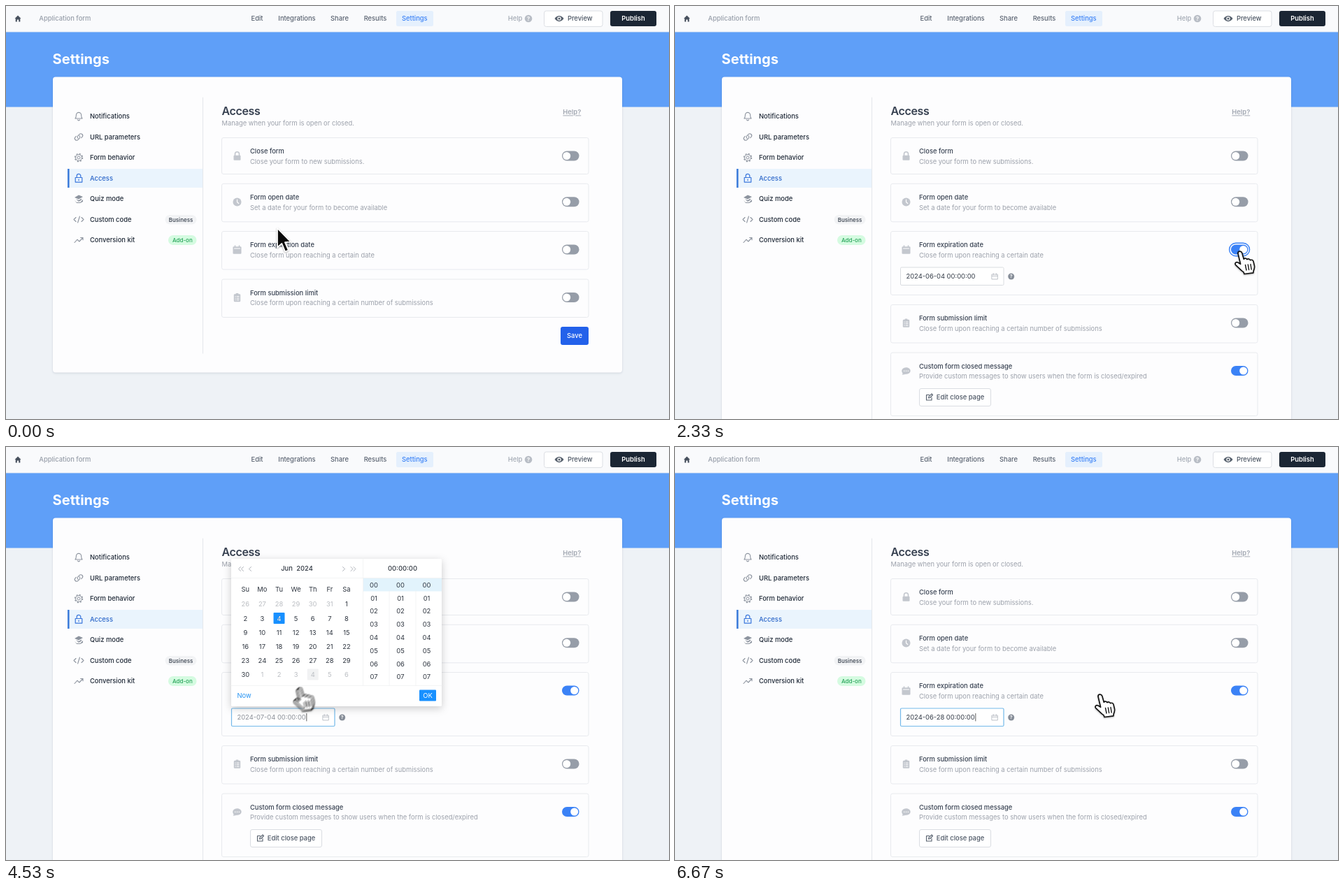
Recreate the animation shown at these times as an HTML page. Size 948 by 591 pixels, loop 6.74 s.

```html
<!DOCTYPE html>
<html lang="en">
<head>
<meta charset="utf-8">
<title>Form settings</title>
<style>
  html, body { margin: 0; width: 100%; height: 100%; overflow: hidden; background: #eef2f6; }
  svg { display: block; width: 100vw; height: 100vh; }
  text { font: 400 9.37px Inter, "Open Sans", sans-serif; white-space: pre; }
  .line { fill: none; stroke-width: 1.1; stroke-linecap: round; stroke-linejoin: round; }
  .timed, .cursor, .knob, .pill { animation: 6740ms linear infinite; }
  .knob { animation-name: knob; }
  .pill { animation-name: pill; }
  @keyframes knob { 0%, 31.9% { transform: none } 33.5%, 100% { transform: translateX(11px) } }
  @keyframes pill { 0%, 31.9% { fill: #969da8 } 33.5%, 100% { fill: #3b82f6 } }
  .cursors { isolation: isolate; filter: drop-shadow(0 1.5px 1.2px rgba(0,0,0,.3)); }
  .cursor { animation-name: travel; opacity: .2; mix-blend-mode: plus-lighter; }
</style>
</head>
<body>
<svg id="stage" viewBox="0 0 948 591" preserveAspectRatio="none"></svg>
<script>
const LOOP = 6740;
const OPENED = 2200, HOVERED = 3300, FOCUSED = 3800, PICKED = 5100, CLOSED = 6200;
const rules = [];
const pct = ms => (ms / LOOP * 100).toFixed(3) + '%';

// Shows content from one time to another, optionally fading in and out.
function during(from, to, content, fade = 1) {
  const name = 'show' + rules.length;
  const stops = [[0, from ? 0 : 1]];
  if (from) stops.push([from, 0], [from + fade, 1]);
  if (to < LOOP) stops.push([to, 1], [to + fade, 0]);
  stops.push([LOOP, to < LOOP ? 0 : 1]);
  rules.push(`@keyframes ${name}{${stops.map(([t, o]) => `${pct(t)}{opacity:${o}}`).join('')}}`);
  return `<g class="timed" style="animation-name:${name}">${content}</g>`;
}

// Text is placed by the vertical middle of its capitals.
function text(x, y, label, color, { size = 9.37, weight = 400, anchor = 'start', extra = '' } = {}) {
  return `<text x="${x}" y="${y + size * .363}" fill="${color}" text-anchor="${anchor}"
    style="font-size:${size}px;font-weight:${weight};${extra}">${label}</text>`;
}
const mid = (x, y, label, color, weight = 500, size) =>
  text(x, y, label, color, { weight, size, anchor: 'middle' });
const box = (x, y, w, h, fill, r = 0, stroke = 'none', more = '') =>
  `<rect x="${x}" y="${y}" width="${w}" height="${h}" rx="${r}" fill="${fill}" stroke="${stroke}" ${more}/>`;
const line = (d, color, width = 1.1) =>
  `<path class="line" d="${d}" stroke="${color}" style="stroke-width:${width}"/>`;
const shape = (d, color) => `<path d="${d}" fill="${color}" fill-rule="evenodd"/>`;
const dot = (x, y, r, fill, stroke = 'none') =>
  `<circle cx="${x}" cy="${y}" r="${r}" fill="${fill}" stroke="${stroke}"/>`;
const at = (x, y, content) => `<g transform="translate(${x} ${y})">${content}</g>`;

const padlock = color => line('M-4.8-1h9.6v6.6h-9.6zM-2.8-1v-2.4a2.8 2.8 0 0 1 5.6 0V-1M0 1.5v1.6', color, 1.2);
const calendarOutline = line('M-4-3h8v7h-8zM-4-.6h8M-2-4.3v2M2-4.3v2', '#b8bdc5', .9);
const question = (x, y, r, color) => dot(x, y, r, color) + mid(x, y, '?', '#fff', 700, r * 1.5);

const GRAY = '#8d949f', PALE = '#c3c7ce';
const menuIcons = {
  bell: line('M-5 3C-3.6 1.6-3.8-.5-3.6-2a3.6 3.6 0 0 1 7.2 0C3.8-.5 3.6 1.6 5 3zM-1.5 4.8a1.6 1.6 0 0 0 3 0', GRAY),
  link: line('M-1 1.8a2.6 2.6 0 0 1 0-3.7l2-2a2.6 2.6 0 0 1 3.9 3.7L3.6 1.2M1-1.8a2.6 2.6 0 0 1 0 3.7l-2 2A2.6 2.6 0 0 1-4.9.2l1.3-1.4', GRAY),
  gear: dot(0, 0, 2, 'none', GRAY) + dot(0, 0, 4.4, 'none', GRAY) +
    `<circle r="5.5" fill="none" stroke="${GRAY}" stroke-width="1.4" stroke-dasharray="2.16 2.16"/>`,
  lock: padlock('#3b77dc'),
  quiz: shape('M-6-2L0-5.5L6-3L0 .5zM-4 0L0 2L4-.6V1.5L0 4zM-6 2l3 3h5l4-4v3L2 6h-5z', GRAY),
  code: line('M-4-3L-7 0L-4 3M4-3L7 0L4 3M1.4-4.5L-1.4 4.5', GRAY),
  trend: line('M-6 3.5L-2-.8L.8 2L6-3.5M2.6-3.5H6V-.2', GRAY),
};
const itemIcons = {
  lock: box(-5, -1, 10, 7, PALE, 1) + line('M-3-1v-2a3 3 0 0 1 6 0v2', PALE, 1.6),
  clock: dot(0, 0, 6, PALE) + line('M0-3.3V0l2.2 2', '#fff', 1.2),
  calendar: box(-6, -4.5, 12, 10.5, PALE, 1.2) + line('M-3-5.6v2M3-5.6v2', PALE, 1.5) + line('M-4-1.7h8', '#fff', 1),
  clipboard: box(-4.7, -5, 9.4, 11, PALE, 1.2) + box(-2, -6.2, 4, 2.4, PALE, 1) +
    line('M-2.6-1.5h.4M-.4-1.5h3M-2.6 1h.4M-.4 1h3M-2.6 3.5h.4M-.4 3.5h3', '#fff', 1),
  chat: shape('M0-5C8-5 8.500 4.500 0 4.500C-2 4.500-3 5.500-6 5.500C-4.700 4.200-5 3.500-5.200 3C-8-1-5-5 0-5z', PALE) +
    dot(-2.8, 0, .8, '#fff') + dot(0, 0, .8, '#fff') + dot(2.8, 0, .8, '#fff'),
};

function toggle(y, state) {
  const moving = state === 'moving', on = state === 'on';
  return `<rect ${moving ? 'class="pill"' : ''} x="795" y="${y - 7}" width="24.500" height="14" rx="7" fill="${on ? '#3b82f6' : '#969da8'}"/>` +
    `<circle ${moving ? 'class="knob"' : ''} cx="${on ? 812.7 : 801.7}" cy="${y}" r="5.500" fill="#fff"/>`;
}

function item(y, height, title, note, icon, state = 'off') {
  return box(308.5, y, 524.5, height, '#fdfdfe', 2.5, '#e8eaee') +
    at(330.5, y + 26.2, itemIcons[icon]) +
    text(349, y + 19.3, title, '#374151', { weight: 500 }) +
    text(349, y + 34, note, '#9ca1ab') + toggle(y + 26, state);
}

function topBar() {
  const tabs = [[359, 'Edit'], [416, 'Integrations'], [477, 'Share'], [528, 'Results']];
  return box(0, 0, 948, 37, '#f9fafc') + line('M0 37H948', '#e3e9f1', .8) +
    shape('M12.500 18L17 13.500L21.500 18H20.300V22.500H18.200V19.500H15.800V22.500H13.700V18z', '#48515e') +
    text(47.3, 18, 'Application form', '#979ea9', { weight: 500 }) +
    tabs.map(([x, name]) => mid(x, 18, name, '#596270')).join('') +
    box(558, 7, 53, 22, '#e5f0fd', 2.5) + mid(584.3, 18, 'Settings', '#3b82f6') +
    mid(728, 18, 'Help', '#a3a9b3') + question(747, 18, 5.3, '#b9bec6') +
    box(769.5, 7, 83.5, 22.5, '#fff', 3, '#dcdfe4') +
    shape('M784.500 18C788 12.500 794 12.500 797.500 18C794 23.500 788 23.500 784.500 18z', '#56606d') +
    dot(791, 18, 2.7, '#fff') + dot(791, 18, 1.5, '#56606d') +
    mid(820.7, 18, 'Preview', '#4b5563') +
    box(864, 7, 66, 22, '#1b2634', 3) + mid(897, 18, 'Publish', '#fff', 600);
}

function sideMenu() {
  const rows = [['bell', 'Notifications'], ['link', 'URL parameters'], ['gear', 'Form behavior'], ['lock', 'Access'],
    ['quiz', 'Quiz mode'], ['code', 'Custom code'], ['trend', 'Conversion kit']];
  return box(88, 233, 193, 27, '#eaf4fd') + box(88, 233, 2.6, 27, '#3f7edb') +
    rows.map(([icon, name], i) => {
      const y = 158 + i * 29.5;
      return at(104, y, menuIcons[icon]) +
        text(120, y, name, icon === 'lock' ? '#2b66c9' : '#1f2937', { weight: 500 });
    }).join('') +
    box(227.5, 299, 45, 13.5, '#f2f3f5', 6.7) + mid(250, 305.6, 'Business', '#343d4a', 500, 8) +
    box(232, 328, 40.5, 14, '#d5fbe1', 7) + mid(252.3, 335, 'Add-on', '#28a45a', 500, 8);
}

const LIMIT = ['Form submission limit', 'Close form upon reaching a certain number of submissions', 'clipboard'];
const EXPIRY = ['Form expiration date', 'Close form upon reaching a certain date', 'calendar', 'moving'];
const CARD_SHADOW = 'style="filter:drop-shadow(0 1px 1.500px rgba(60,80,110,.18))"';

const collapsed = () =>
  item(322.5, 54.5, ...EXPIRY) + item(391, 54.5, ...LIMIT) +
  box(793, 459, 40, 26, '#2361ea', 3) + mid(813, 472, 'Save', '#fff');

function dateField() {
  const value = (date, color) => text(330.5, 387, date + ' 00:00:00', color);
  const dark = '#333b47', faded = '#8a8f97';
  return during(OPENED, HOVERED, box(322.5, 374, 147.5, 25.5, '#fff', 1.5, '#d9dce0')) +
    during(HOVERED, FOCUSED, box(321.8, 373.3, 148.8, 27, '#fff', 2, '#7caaf0', 'stroke-width="1.600"')) +
    during(FOCUSED, LOOP, box(322.5, 374, 147.5, 25.5, '#fff', 1.5, '#74b9ea', 'stroke-width="1.200"')) +
    during(OPENED, 4480, value('2024-06-04', dark)) +
    during(4480, 4620, value('2024-07-04', faded)) +
    during(4620, PICKED, value('2024-06-28', faded)) +
    during(PICKED, LOOP, value('2024-06-28', dark)) +
    during(FOCUSED, LOOP, line('M429.800 381.500V392', '#333', .8)) +
    during(OPENED, HOVERED, at(457.3, 387, calendarOutline)) +
    during(HOVERED, 4400, at(457.3, 387, dot(0, 0, 4.6, '#bfc3c9') + line('M-1.500-1.500l3 3M1.500-1.500l-3 3', '#fff', 1))) +
    during(4400, LOOP, at(457.3, 387, calendarOutline)) +
    question(480.7, 387, 4.5, '#878e99');
}

const expanded = () =>
  box(67, 500, 814, 100, '#fdfdfe') + line('M281.500 490V591', '#e5e8ec') +
  item(322.5, 91, ...EXPIRY) +
  during(OPENED, FOCUSED, box(792.6, 339.2, 29, 18.6, 'none', 9.3, '#3b82f6', 'stroke-width="1.400"')) +
  dateField() + item(427.5, 54.5, ...LIMIT) +
  item(496, 90.5, 'Custom form closed message',
    'Provide custom messages to show users when the form is closed/expired', 'chat', 'on') +
  box(349.5, 547.5, 102, 25, '#fff', 2.5, '#dadde2') +
  line('M363.500 556.500H359.500V564H367V560.500M362.500 561L363 558.800L367 555L368.500 556.500L364.700 560.500z', '#56606d') +
  text(373.8, 560, 'Edit close page', '#4b5563', { weight: 500 });

function calendar() {
  const colX = i => 342.3 + 24.1 * i, rowY = r => 225 + 20.1 * r;
  const cell = (i, r, fill, stroke) => box(colX(i) - 8, rowY(r) - 8, 16, 16, fill, 1, stroke);
  const days = [];
  for (let n = 0; n < 42; n++) {
    const day = n < 6 ? 26 + n : n < 36 ? n - 5 : n - 35;
    const outside = n < 6 || n > 35;
    days.push(mid(colX(n % 7), rowY(Math.floor(n / 7)), day, outside ? '#bbbec3' : '#2f3640', 400));
  }
  const chevron = (x, dir) => line(`M${x + dir * 1.5} 171.500L${x - dir * 1.5} 174.500L${x + dir * 1.5} 177.500`, '#a5aab2', .9);
  const hours = [526, 564, 601.5].map(x => Array.from({ length: 8 }, (_, i) =>
    mid(x, 197.3 + i * 18.8, '0' + i, '#2f3640', 400)).join('')).join('');
  return box(322, 160, 301, 211, '#fff', 1.5, 'none', 'style="filter:drop-shadow(0 3px 6px rgba(0,0,0,.2))"') +
    box(511, 187.5, 112, 19, '#e2f3fc') +
    line('M322 187.500H623M322 341.500H623M510.500 160V341M548 206V341M586 206V341', '#f0f1f3', .8) +
    [[334, 1], [338, 1], [349, 1], [483, -1], [494.5, -1], [498.5, -1]].map(c => chevron(...c)).join('') +
    mid(401.5, 174, 'Jun', '#2f3640') + mid(427, 174, '2024', '#2f3640') + mid(567, 174, '00:00:00', '#2f3640') +
    ['Su', 'Mo', 'Tu', 'We', 'Th', 'Fr', 'Sa'].map((d, i) => mid(colX(i), 204, d, '#2f3640', 400)).join('') +
    during(FOCUSED, PICKED, cell(2, 1, '#1890ff')) +
    during(PICKED, LOOP, cell(2, 1, '#e6f3fd', '#6a9fd0') + cell(5, 4, '#1890ff')) +
    during(4480, 4620, cell(4, 5, '#f1f2f3')) +
    during(4620, PICKED, cell(5, 4, '#f1f2f3')) +
    days.join('') +
    during(FOCUSED, PICKED, mid(colX(2), rowY(1), '4', '#fff', 400)) +
    during(PICKED, LOOP, mid(colX(5), rowY(4), '28', '#fff', 400)) +
    hours + text(330.5, 355.5, 'Now', '#2492f2') +
    box(591, 347.5, 24, 16, '#1890ff', 1) + mid(603, 355.5, 'OK', '#fff', 400);
}

const arrow = '<path d="M0 0V27.500L6.300 21.800L11.200 33.500L15.800 31.500L10.900 20.200L19 19.500z" fill="#080808" stroke="#fff" stroke-width="1.700" stroke-linejoin="round"/>';
const hand = at(-8, -1, `<path d="M5 4C4.600.6 9.600 0 10.700 3.200L13.300 12.200C14.500 10.500 17 10.900 17.900 12.700C19.400 11.300 21.800 11.800 22.500 13.700C24.400 12.700 26.500 13.500 27 15.600L28.500 22C29 26 27.600 27 27.200 29L26.800 31.800L14 33.500L13 30.800C9.500 28.800 6 24.500 2 21C-.3 18.700 2 15.500 5 17L8.600 19.300z"
  fill="#fff" stroke="#111" stroke-width="1.700" stroke-linejoin="round"/>` +
  line('M15.500 20.500L17 28M19.300 20L20.600 27.500M23 19.500L24.200 27', '#111', 1.4));
const beamPath = 'M-7-14.500C-3-14.500 0-13.500 0-10.500C0-13.500 3-14.500 7-14.500M0-11V11M-7 14.500C-3 14.500 0 13.500 0 10.500C0 13.500 3 14.500 7 14.500M-3 1.500H3';
const beam = line(beamPath, '#fff', 4.2) + line(beamPath, '#1c1c1c', 2.2);

// Averaged copies, a few milliseconds apart, give the pointer its motion blur.
function cursors() {
  const path = [[0, 388, 318], [200, 388, 318], [1750, 808, 361], [1830, 808, 361], [2000, 808, 351],
    [2730, 808, 351], [3630, 379, 383], [4240, 379, 383], [4860, 465, 302], [5350, 465, 302],
    [6000, 608, 354], [LOOP, 608, 354]];
  rules.push(`@keyframes travel{${path.map(([t, x, y]) =>
    `${pct(t)}{transform:translate(${x}px,${y}px);animation-timing-function:ease-in-out}`).join('')}}`);
  const looks = during(0, 1950, arrow) + during(1950, HOVERED, hand) +
    during(HOVERED, 4420, beam) + during(4420, LOOP, hand);
  const copies = [-2, -1, 0, 1, 2].map(i =>
    `<g class="cursor" style="animation-delay:${i * 4 - 8}ms">${looks}</g>`);
  return `<g class="cursors">${copies.join('')}</g>`;
}

const scene =
  box(0, 0, 948, 591, '#eef2f6') + box(0, 37, 948, 107.5, '#5f9ff8') + topBar() +
  text(66.5, 76, 'Settings', '#fff', { size: 20.1, weight: 700 }) +
  during(0, OPENED, box(67, 101.5, 814, 423, '#fdfdfe', 4, 'none', CARD_SHADOW)) +
  during(OPENED, LOOP, box(67, 101.5, 814, 510, '#fdfdfe', 4, 'none', CARD_SHADOW)) +
  line('M281.500 131V497', '#e5e8ec') + sideMenu() +
  text(308.5, 150.5, 'Access', '#374151', { size: 16, weight: 600, extra: 'letter-spacing:-.35px' }) +
  text(308.5, 168, 'Manage when your form is open or closed.', '#9ca1ab') +
  text(809.3, 152, 'Help?', '#a0a6b0', { weight: 600, anchor: 'middle', extra: 'text-decoration:underline' }) +
  item(188.5, 52, 'Close form', 'Close your form to new submissions.', 'lock') +
  item(254.3, 54.5, 'Form open date', 'Set a date for your form to become available', 'clock') +
  during(0, OPENED, collapsed()) + during(OPENED, LOOP, expanded()) +
  during(FOCUSED, CLOSED, calendar(), 140) + cursors();

document.getElementById('stage').innerHTML = `<style>${rules.join('\n')}</style>${scene}`;
</script>
</body>
</html>
```
